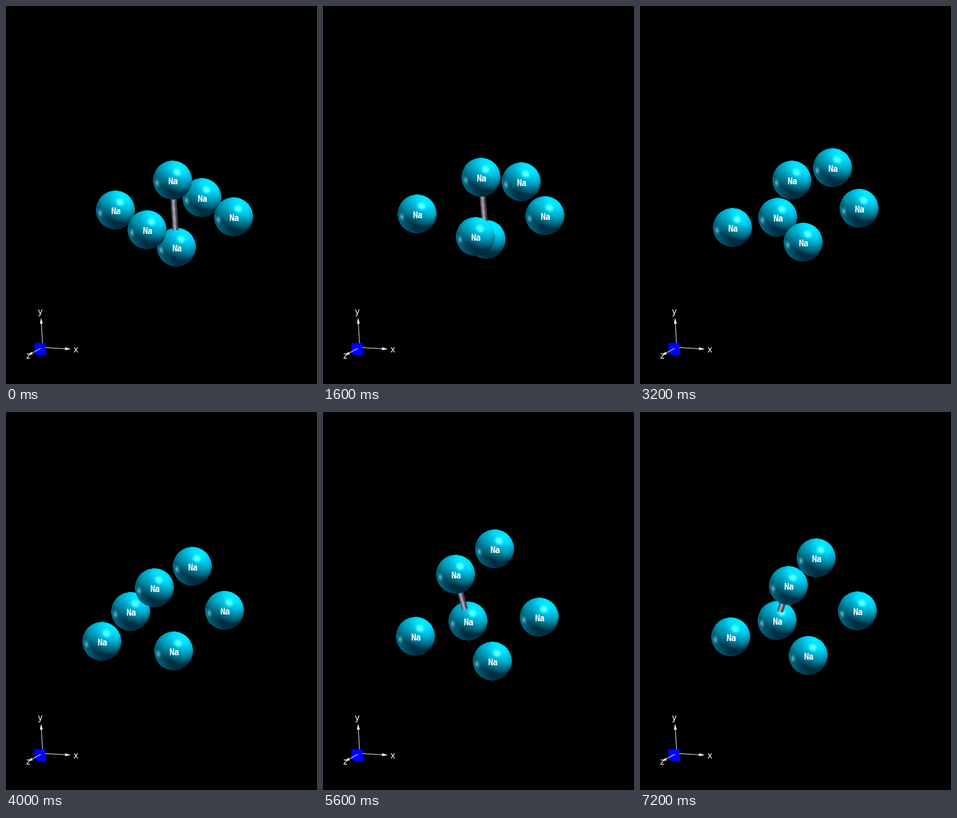
These frames come from a looping animation (550 px wide and 670 px high, 8000 ms). A matplotlib script:

```python
import numpy as np
import matplotlib.pyplot as plt
from matplotlib.animation import FuncAnimation
from matplotlib.lines import Line2D

W, H, DPI = 550, 670, 100
PX = 72 / DPI            # points per pixel
R = 34.3                 # atom radius
HALF = 34                # whole pixels either side of an atom's centre
BOND_LENGTH = 134
BOND_WIDTH = 10.5
STEPS = 10

# Key positions of the atoms, listed from back to front.
KEY_STEPS = np.array([0, 3, 5, 7, 8, 9])
KEYS = {
    "low": [(301, 427), (274, 400), (220, 353), (256, 370), (269, 381), (242, 369)],
    "left": [(193, 361), (159, 376), (169, 406), (163, 397), (163, 389), (160, 398)],
    "back": [(346, 339), (348, 298), (329, 273), (303, 242), (319, 258), (311, 258)],
    "right": [(402, 373), (388, 367), (386, 351), (382, 363), (387, 368), (384, 352)],
    "top": [(294, 308), (272, 303), (262, 311), (234, 287), (241, 285), (262, 307)],
    "front": [(249, 396), (278, 413), (296, 423), (299, 441), (293, 445), (297, 431)],
}


def position(name, step):
    """Smooth cubic path through an atom's keys, in whole pixels."""
    pts = np.array(KEYS[name], float)
    speed = np.gradient(pts, KEY_STEPS, axis=0)
    i = min(np.searchsorted(KEY_STEPS, step, side="right"), len(pts) - 1) - 1
    span = KEY_STEPS[i + 1] - KEY_STEPS[i]
    s = (step - KEY_STEPS[i]) / span
    ease = s * s * (3 - 2 * s)
    p = pts[i] + ease * (pts[i + 1] - pts[i])
    p += span * s * (1 - s) * ((1 - s) * speed[i] - s * speed[i + 1])
    return np.rint(p).astype(int)


def unit(*v):
    v = np.array(v, float)
    return v / np.linalg.norm(v)


def sphere():
    """Shaded cyan ball with a key light and a dim light from behind."""
    g = np.arange(-HALF, HALF + 1) / R
    x, y = np.meshgrid(g, -g)
    r2 = x**2 + y**2
    normal = np.dstack([x, y, np.sqrt(np.clip(1 - r2, 0, 1))])

    def diffuse(light):
        return np.clip(normal @ light, 0, None)

    def gloss(half):
        return np.clip(normal @ half, 0, 1) ** 80

    lit = 0.8 * diffuse(unit(0.41, 0.72, 0.55))
    lit += 0.3 * diffuse(unit(-0.93, -0.18, -0.30))
    shine = 0.5 * gloss(unit(0.235, 0.41, 0.88))
    shine += 0.35 * gloss(unit(-0.79, -0.15, 0.59))
    rgba = np.dstack([shine, 0.18 + 0.92 * lit + shine, 0.26 + lit + shine, r2 <= 1])
    return np.clip(rgba, 0, 1)


fig = plt.figure(figsize=(W / DPI, H / DPI), dpi=DPI, facecolor="black")
ax = fig.add_axes([0, 0, 1, 1])
FONT = dict(color="white", size=15 * PX, family="DejaVu Sans Mono",
            ha="center", va="baseline")


def arrow(start, tip, head=10, half_width=2.6):
    start, tip = np.array(start, float), np.array(tip, float)
    along = (tip - start) / np.linalg.norm(tip - start)
    side = np.array([-along[1], along[0]]) * half_width
    base = tip - along * head
    ax.plot(*zip(start, base), color="white", lw=PX)
    ax.fill(*zip(tip, base + side, base - side), color="white", lw=0)


# Axis marker in the corner
ax.fill([50, 70, 71, 55, 54, 51], [597.5, 597, 619.5, 619, 617, 616.5],
        color="#0000ff", lw=0)
arrow((64.5, 597), (62, 553))
arrow((70, 605.5), (114.5, 608))
arrow((61, 607), (40, 618.5), head=7)
ax.text(59.6, 547.5, "y", **FONT)
ax.text(123, 614, "x", **FONT)
ax.text(38.8, 625, "z", **FONT)

# Atoms and their labels
ball = sphere()
atoms = {}
for depth, name in enumerate(KEYS):
    image = fig.figimage(ball, zorder=10 + 2 * depth)
    label = fig.text(0, 0, "Na", transform=ax.transData, weight="bold",
                     zorder=10.5 + 2 * depth, **FONT)
    atoms[name] = image, label

# The bond is a bundle of thin strips shaded across its width.
bond = []
for t in np.linspace(-0.9, 0.9, 11):
    tone = 0.3 + 0.6 * np.exp(-((t + 0.1) / 0.5) ** 2)
    strip = Line2D([], [], color=tone * np.array([0.78, 0.75, 0.86]),
                   lw=1.3 * PX, solid_capstyle="butt",
                   transform=ax.transData, zorder=17.5)
    fig.add_artist(strip)
    bond.append((t, strip))

ax.set_xlim(0, W)
ax.set_ylim(H, 0)
ax.axis("off")


def place_bond(step):
    near = position("top", step) + 0.5
    far = position("low", step) + 0.5
    dist = np.hypot(*(near - far))
    along = (near - far) / dist
    side = np.array([-along[1], along[0]]) * BOND_WIDTH / 2
    reach = R * dist / BOND_LENGTH
    for t, strip in bond:
        end = far + along * (reach + 1 - 2 * np.sqrt(1 - t * t)) + side * t
        strip.set_data(*zip(near + side * t, end))
        strip.set_visible(not 3 < step < 7)   # the pair drifts apart here


def update(step):
    for name, (image, label) in atoms.items():
        x, y = (int(v) for v in position(name, step))
        image.ox, image.oy = x - HALF, H - (y + HALF + 1)
        image.stale = True
        label.set_position((x + 0.7, y + 8))
    place_bond(step)
    return []


anim = FuncAnimation(fig, update, frames=STEPS, init_func=lambda: update(0),
                     interval=800, repeat=True, repeat_delay=0)
plt.show()
```
